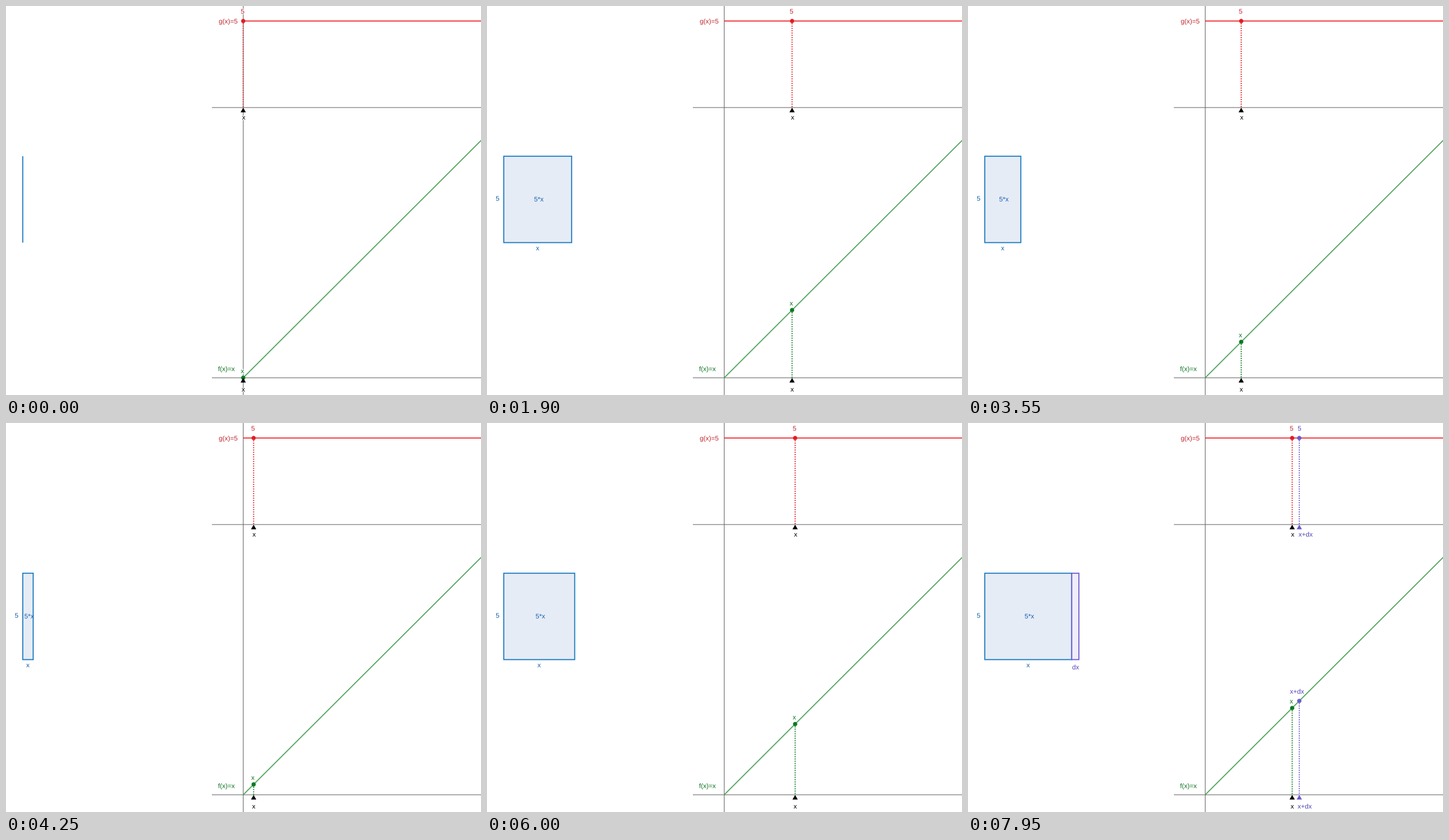
Animation, 826 px wide and 678 px high, one loop 8 s. Source, as a matplotlib script:

```python
import numpy as np
import matplotlib.pyplot as plt
from matplotlib import patheffects
from matplotlib.animation import FuncAnimation
from matplotlib.patches import Circle, Polygon, Rectangle

W, H, DPI = 826, 678, 64
PX = 72 / DPI                      # points per pixel
STEP, FRAMES = 50, 160

OX, TOP, BASE = 412.5, 177.0, 648.0   # axis origin, upper and lower x-axes
RED_Y = 26.2                          # height of the constant function
LEFT, BOX_TOP, BOX_BOTTOM = 29.2, 261.8, 412.4

RED, GREEN, PURPLE, BLUE = "#e01e25", "#0b7a20", "#6a5acd", "#1a7ac0"
RED_TXT, GREEN_TXT, PURPLE_TXT, BLUE_TXT = "#c0262d", "#0c7420", "#5046b8", "#1560b0"

plt.rcParams["font.family"] = "Liberation Sans"
plt.rcParams["text.hinting"] = "no_hinting"

fig = plt.figure(figsize=(W / DPI, H / DPI), dpi=DPI, facecolor="white")
ax = fig.add_axes([0, 0, 1, 1])
ax.set_xlim(0, W)
ax.set_ylim(H, 0)
ax.axis("off")


def line(xs, ys, color, width, z, **kw):
    return ax.plot(xs, ys, color=color, lw=width * PX, zorder=z, snap=False,
                   solid_capstyle="butt", **kw)[0]


def label(s, x, y, color, halo=True):
    # Path effects draw glyphs as outlines, so they can sit between pixels.
    effect = (patheffects.withStroke(linewidth=2.4 * PX, foreground="white")
              if halo else patheffects.Normal())
    return ax.text(x, y, s, color=color, fontsize=11.5 * PX, ha="center",
                   va="baseline", zorder=9, path_effects=[effect])


def dotted(color):
    return line([0, 0], [0, 0], color, 1.8, 4, ls=(0, (1.05, 1.17)),
                dash_capstyle="butt")


def dot(color):
    return ax.add_patch(Circle((0, 0), 3.5, fc=color, ec=color,
                               lw=0.4 * PX, zorder=6, snap=False))


def box(edge, face, z):
    return ax.add_patch(Rectangle((LEFT, BOX_TOP), 0, BOX_BOTTOM - BOX_TOP,
                                  fc=face, ec=edge, lw=1.8 * PX, zorder=z,
                                  joinstyle="miter", snap=False))


class Marker:
    """Vertical probe on one graph: arrow, dotted stem, point and two labels."""

    def __init__(self, base, colors, name, value, name_at, value_at):
        stem, text, arrow = colors
        self.base, self.name_at, self.value_at = base, name_at, value_at
        self.stem, self.point = dotted(stem), dot(stem)
        self.arrow = ax.add_patch(Polygon([(0, 0)] * 3, fc=arrow, lw=0,
                                          zorder=7, snap=False))
        self.name = label(name, 0, base + name_at[1],
                          "black" if arrow == "black" else text)
        self.value = label(value, 0, 0, text)
        self.parts = [self.stem, self.point, self.arrow, self.name, self.value]

    def move(self, x, y):
        b = self.base
        self.stem.set_data([x, x], [y, b])
        self.point.center = (x, y)
        self.arrow.set_xy([(x, b + 0.2), (x - 4.6, b + 8.3), (x + 4.6, b + 8.3)])
        self.name.set_x(x + self.name_at[0])
        self.value.set_position((x + self.value_at[0], y + self.value_at[1]))

    def show(self, on):
        for p in self.parts:
            p.set_visible(on)


# Fixed axes, curves and function names
for y in (TOP, BASE):
    line([358, W], [y, y], "#6a6a6a", 1.1, 1)
line([OX, OX], [0, H], "#6a6a6a", 1.1, 1)
line([OX, W], [RED_Y, RED_Y], "#ee2a30", 1.8, 3)
line([OX, OX + 430], [BASE, BASE - 430], "#51a45f", 1.8, 3)
label("g(x)=5", 386.4, 30.5, RED_TXT)
label("f(x)=x", 383.3, 636.3, GREEN_TXT)

# Area model
area = box(BLUE, "#e6ecf6", 2)
strip = box(PURPLE, "#efecfd", 3)
side = label("5", 18.4, 339.4, BLUE_TXT, False)
area_txt = label("5*x", 0, 340.6, BLUE_TXT, False)
width_txt = label("x", 0, 425.8, BLUE_TXT, False)
strip_txt = label("dx", 0, 429.5, PURPLE_TXT, False)

# Probes at x + dx and at x
VIOLET = (PURPLE, PURPLE_TXT, PURPLE)
g_next = Marker(TOP, VIOLET, "x+dx", "5", (11, 21), (0.4, -12.9))
f_next = Marker(BASE, VIOLET, "x+dx", "x+dx", (9.4, 24), (-4, -12.6))
g_now = Marker(TOP, (RED, RED_TXT, "black"), "x", "5", (0.9, 21), (-1, -12.9))
f_now = Marker(BASE, (GREEN, GREEN_TXT, "black"), "x", "x", (0.2, 24), (-1.3, -8))

# Slider path: time in ms and width in pixels
KEY_T = np.array([650, 1900, 2450, 2750, 3550, 4220, 5000, 6000, 6850], float)
KEY_X = np.array([0, 118, 186, 174.2, 62.6, 18, 54.3, 123.3, 151.2])


def tangents(t, v):
    s = np.diff(v) / np.diff(t)
    m = np.zeros(len(t))
    m[0] = s[0]
    for i in range(1, len(s)):
        if s[i - 1] * s[i] > 0:
            m[i] = 2 * s[i - 1] * s[i] / (s[i - 1] + s[i])
    return m


KEY_M = tangents(KEY_T, KEY_X)


def slider(t):
    t = min(max(t, KEY_T[0]), KEY_T[-1])
    i = min(np.searchsorted(KEY_T, t, "right") - 1, len(KEY_T) - 2)
    h = KEY_T[i + 1] - KEY_T[i]
    u = (t - KEY_T[i]) / h
    return ((1 + 2 * u) * (1 - u) ** 2 * KEY_X[i] + u * (1 - u) ** 2 * h * KEY_M[i]
            + u * u * (3 - 2 * u) * KEY_X[i + 1] + u * u * (u - 1) * h * KEY_M[i + 1])


def update(n):
    t = n * STEP
    x = slider(t)
    dx = 12.4 * min(max((t - 6950) / 1000, 0), 1)

    area.set_width(x)
    area_txt.set_x(LEFT + x / 2 + 1.9)
    width_txt.set_x(LEFT + x / 2 - 0.2)
    for a in (side, area_txt, width_txt):
        a.set_visible(x > 0)

    strip.set_x(LEFT + x)
    strip.set_width(dx)
    strip_txt.set_x(LEFT + x + dx / 2 + 0.5)
    for a in (strip, strip_txt):
        a.set_visible(dx > 0)

    g_now.move(OX + x, RED_Y)
    f_now.move(OX + x, BASE - x)
    g_next.move(OX + x + dx, RED_Y)
    f_next.move(OX + x + dx, BASE - x - dx)
    g_next.show(dx > 0)
    f_next.show(dx > 0)
    return []


anim = FuncAnimation(fig, update, frames=FRAMES, init_func=lambda: update(0),
                     interval=STEP, repeat=True, repeat_delay=0, blit=False)
plt.show()
```
